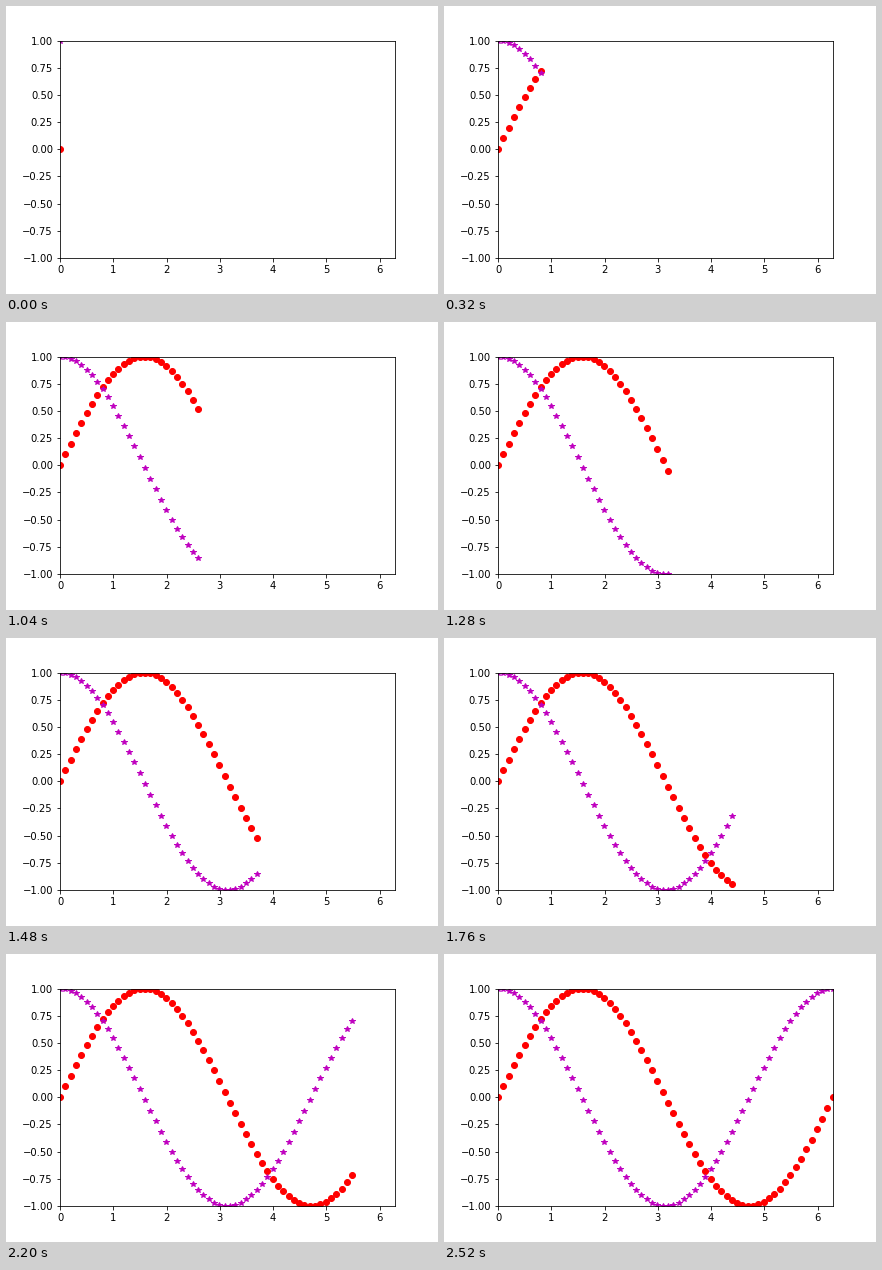
Animation of 432x288 px, one loop 2.56 s. Source, as a matplotlib script:

```python
import numpy as np
import matplotlib.pyplot as plt
from matplotlib.animation import FuncAnimation

FRAMES = 64
INTERVAL = 40  # ms

plt.rcParams.update({"font.family": "DejaVu Sans", "font.size": 10})

fig, ax = plt.subplots(figsize=(6, 4), dpi=72, facecolor="white")
fig.subplots_adjust(left=0.125, right=0.9, bottom=0.125, top=0.88)
ax.set_xlim(0, 2 * np.pi)
ax.set_ylim(-1, 1)

x = np.linspace(0, 2 * np.pi, FRAMES)
sin_dots, = ax.plot([], [], "ro")
cos_stars, = ax.plot([], [], "m*")


def update(i):
    shown = x[:i + 1]
    sin_dots.set_data(shown, np.sin(shown))
    cos_stars.set_data(shown, np.cos(shown))
    return sin_dots, cos_stars


anim = FuncAnimation(fig, update, frames=FRAMES, interval=INTERVAL,
                     init_func=lambda: update(0), repeat=True,
                     repeat_delay=0, blit=False)
plt.show()
```
